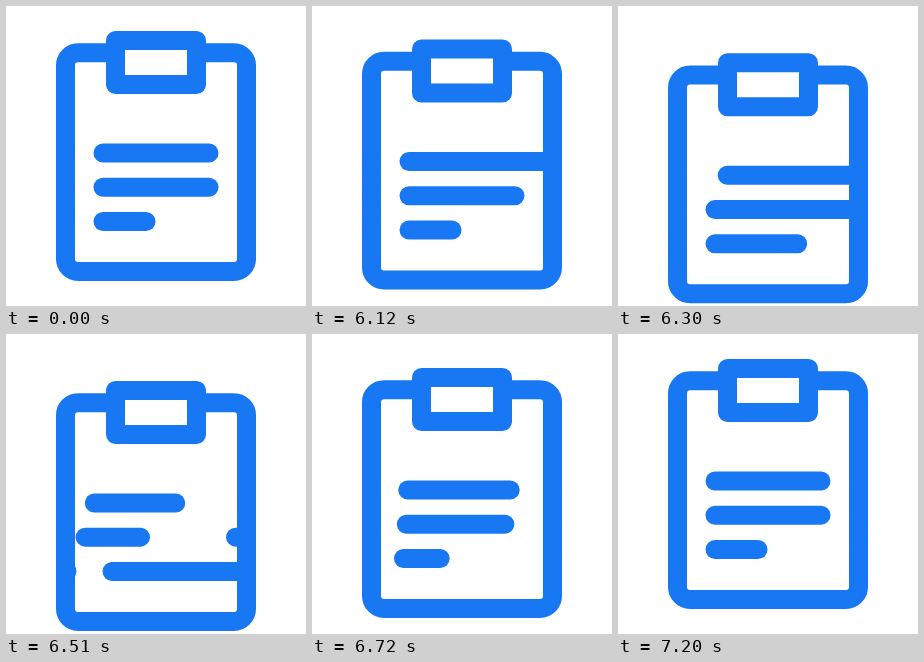
Write an HTML page that moves like this. It is 300x300 px and loops after 7230 ms.

```html
<!DOCTYPE html>
<html lang="en">
<head>
<meta charset="utf-8">
<title>Clipboard</title>
<style>
  html, body { margin: 0; width: 100%; height: 100%; overflow: hidden; background: #fff; }
  svg { display: block; width: 100vw; height: 100vh; }
  g { fill: none; stroke: #1877f2; stroke-width: 19; stroke-linecap: round; stroke-linejoin: round; }
</style>
</head>
<body>
<svg viewBox="0 0 300 300">
  <g id="board">
    <rect x="59.5" y="46.7" width="181" height="218.8" rx="12.5"/>
    <rect x="109.5" y="34.5" width="81" height="44" fill="#fff"/>
  </g>
</svg>
<script>
const LOOP = 7230, STEP = 30;
const LEFT = 97, EDGE_IN = 59.5, EDGE_OUT = 240.5;
const DROP = 23.2;
const EXIT_LAG = 107, ENTER_LAG = 80;

const board = document.getElementById('board');
const clamp = x => Math.min(1, Math.max(0, x));
const mix = (a, b, p) => a + (b - a) * p;
const span = (t, start, length) => clamp((t - start) / length);

// cubic-bezier(.4, 0, .2, 1)
function smooth(x) {
  let lo = 0, hi = 1;
  for (let i = 0; i < 24; i++) {
    const s = (lo + hi) / 2, r = 1 - s;
    if (1.2 * r * r * s + 0.6 * r * s * s + s * s * s < x) lo = s; else hi = s;
  }
  return lo * lo * (3 - 2 * lo);
}

// exponential settling that reaches exactly 1
function settle(x) {
  const k = 6.2, end = Math.exp(-k);
  return 1 - (Math.exp(-k * x) - end) / (1 - end);
}

function addLine(y) {
  const line = document.createElementNS('http://www.w3.org/2000/svg', 'line');
  line.setAttribute('y1', y);
  line.setAttribute('y2', y);
  board.appendChild(line);
  return line;
}

function place(line, from, to) {
  line.setAttribute('x1', from);
  line.setAttribute('x2', to);
}

const rows = [[147, 203], [181.2, 203], [215.5, 140]].map(([y, right]) => ({
  right, leaving: addLine(y), entering: addLine(y)
}));

function draw(t) {
  const y = DROP * (smooth(span(t, 6000, 400)) - smooth(span(t, 6400, 800)));
  board.setAttribute('transform', `translate(0 ${y})`);
  rows.forEach(({ right, leaving, entering }, i) => {
    const out = t - i * EXIT_LAG;
    place(leaving,
      mix(LEFT, EDGE_OUT, smooth(span(out, 6266, 204))),
      mix(right, EDGE_OUT, smooth(span(out, 6024, 200))));
    const p = settle(span(t - i * ENTER_LAG, 6348, 690));
    place(entering, mix(EDGE_IN, LEFT, p), mix(EDGE_IN, right, p));
  });
}

const begin = performance.now();
function tick() {
  const t = (performance.now() - begin) % LOOP;
  draw(Math.floor(t / STEP) * STEP);
  requestAnimationFrame(tick);
}
tick();
</script>
</body>
</html>
```
